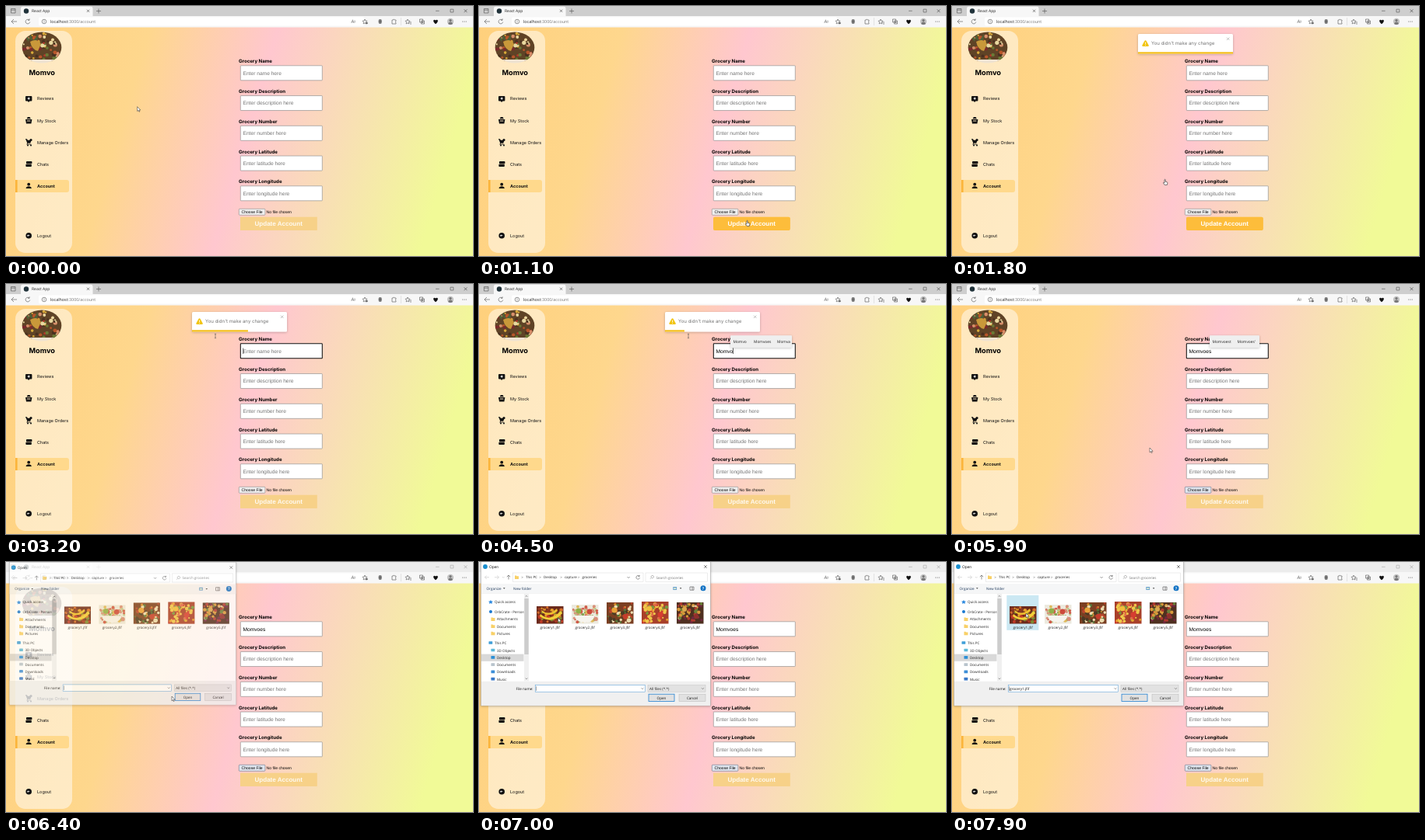
An HTML page that plays this animation: 600 px wide and 322 px high, repeating every 8000 ms.

```html
<!DOCTYPE html>
<html lang="en">
<head>
<meta charset="utf-8">
<title>Account page</title>
<style>
  html, body { margin: 0; width: 100%; height: 100%; overflow: hidden; }
  svg { display: block; width: 100%; height: 100%; text-rendering: geometricPrecision; }
  .page { font-family: Inter, sans-serif; }
  .sys { font-family: "Open Sans", sans-serif; }
  .native { font-family: "Liberation Sans", Arial, sans-serif; }
  .line { fill: none; stroke: #505050; stroke-width: .6; }
</style>
</head>
<body>
<svg id="stage" viewBox="0 0 600 322" preserveAspectRatio="none">
  <defs>
    <linearGradient id="sunset" gradientUnits="userSpaceOnUse" x1="-16" y1="81.5" x2="616" y2="267">
      <stop offset="0" stop-color="#ffd07c"/>
      <stop offset=".27" stop-color="#fed78d"/>
      <stop offset=".51" stop-color="#ffc7cf"/>
      <stop offset=".9" stop-color="#f1fa97"/>
    </linearGradient>
    <filter id="shadow" x="-20%" y="-50%" width="140%" height="200%">
      <feDropShadow dx="0" dy=".8" stdDeviation="1.6" flood-opacity=".25"/>
    </filter>
    <clipPath id="avatarClip"><ellipse cx="46" cy="53.5" rx="25.3" ry="20"/></clipPath>
    <clipPath id="treeClip"><rect x="3" y="41" width="54.5" height="112"/></clipPath>
  </defs>
</svg>
<script>
const LOOP = 8000, STEP = 100;
const stage = document.getElementById('stage');
const BRAND = 'Momvo', TYPED = 'Momvoes';

// Markup helpers
const rect = (x, y, w, h, fill, extra = '') =>
  `<rect x="${x}" y="${y}" width="${w}" height="${h}" fill="${fill}" ${extra}/>`;
const circle = (x, y, r, fill, extra = '') =>
  `<circle cx="${x}" cy="${y}" r="${r}" fill="${fill}" ${extra}/>`;
const text = (x, y, size, str, fill = '#222', extra = '') =>
  `<text x="${x}" y="${y}" font-size="${size}" fill="${fill}" ${extra}>${str}</text>`;
const line = (d, extra = '') => `<path class="line" d="${d}" ${extra}/>`;
const shape = (d, fill = '#111', extra = '') => `<path d="${d}" fill="${fill}" ${extra}/>`;
const group = (attrs, ...parts) => `<g ${attrs}>${parts.join('')}</g>`;
const cross = (x, y, r, color = '#333') =>
  line(`M${x - r} ${y - r}l${2 * r} ${2 * r}m0 ${-2 * r}l${-2 * r} ${2 * r}`, `style="stroke:${color}"`);

function randomizer(seed) {
  return () => (seed = (seed * 16807) % 2147483647) / 2147483647;
}

// Pile of fruit-coloured blobs
function fruit(x, y, w, h, seed, colors, base) {
  const rnd = randomizer(seed);
  let blobs = rect(x, y, w, h, base);
  for (let i = 0; i < 60; i++) {
    const r = 1 + rnd() * 1.7;
    const cx = x + r + rnd() * (w - 2 * r), cy = y + r + rnd() * (h - 2 * r);
    blobs += circle(cx.toFixed(1), cy.toFixed(1), r.toFixed(1), colors[Math.floor(rnd() * colors.length)]);
  }
  return blobs;
}

function browser() {
  const reload = x => line(`M${x + 2} 18.2a2.8 2.8 0 1 0 .7 2.4m-.6-4.3v2h-2`);
  const star = (x, y) => line(`M${x} ${y - 3}l.9 2 2.1.3-1.5 1.5.3 2.1-1.8-1-1.8 1 .3-2.1-1.5-1.5 2.1-.3z`);
  return group('class="sys"',
    rect(0, 0, 600, 13.5, '#cecece', 'id="strip"'),
    rect(0, 13, 600, 14.5, '#f7f7f7'),
    rect(42, 14.5, 418, 11, '#fff', 'rx="2"'),
    shape('M19 13.5V3Q19 .8 21.5 .8H109Q111.5 .8 111.5 3V13.5z', '#f7f7f7'),
    line('M6.5 3.5h5.5v5.5h-5.5zm0 1.7h5.5'),
    circle(26, 6.5, 3.2, '#20323a'),
    text(33, 8.4, 5, 'React App'),
    cross(105.5, 6.3, 1.6),
    group('id="controls"',
      line('M119 3.5v6m-3-3h6M552 6.3h4.6M571 4.2h3.8v3.8h-3.8z'), cross(590.5, 6.3, 1.9)),
    line('M14 20H7m3-3-3 3 3 3'), reload(28),
    `<circle class="line" cx="49" cy="20" r="2.8"/>`, line('M49 19.4v2m0-3.4v.7'),
    text(57, 22, 5.4, 'localhost<tspan fill="#777">:3000/account</tspan>'),
    text(443.5, 22, 6, 'A<tspan font-size="3.5" dy="-1.5">))</tspan>', '#555'),
    star(461, 20), circle(463.5, 22, 1.3, '#666'),
    rect(478.7, 17.2, 4, 5.6, '#888', 'rx="1"'), line('M480.7 17v6m-2.2-3h4.5'),
    line('M496 18h1.5q.8-2.2 1.8 0h1.7v1.7q-2 .8 0 1.8V23h-5z'),
    rect(507, 15, .5, 10, '#ccc'), star(516, 20), line('M518 21h3m-2 2h2'),
    line('M531.5 17h4v4h-4zm2 2h4v4h-4zm2 .8v2.4m-1.2-1.2h2.4'),
    shape('M552 23.2q-3.3-2.5-2.8-4.6 1.1-1.8 2.8-.2 1.7-1.6 2.8.2.5 2.1-2.8 4.6z'),
    circle(571, 20, 4.2, '#c4c4c4'), circle(571, 18.6, 1.6, '#777'),
    shape('M568 23q.4-2.6 3-2.6t3 2.6q-3 2-6 0z', '#777'),
    [586.8, 589, 591.2].map(x => circle(x, 20, .5, '#444')).join(''));
}

function sidebar() {
  const items = [['Reviews', 121.3], ['My Stock', 149.5], ['Manage Orders', 177.7],
    ['Chats', 205.8], ['Account', 234], ['Logout', 297.8]];
  const icons =
    shape('M26 116h6.4q1 0 1 1v4.4q0 1-1 1h-2l-1.3 1.7-1.3-1.7h-1.8q-1 0-1-1V117q0-1 1-1z') +
    shape('M29.2 117l.6 1.5 1.5.6-1.5.6-.6 1.5-.6-1.5-1.5-.6 1.5-.6z', '#fff') +
    shape('M25 146h8.4l-1 5.4h-6.4zM26.5 145.3l1.4-2.3h2.6l1.4 2.3z') + rect(27, 147.5, 4.4, 1, '#fde8c4') +
    shape('M25 171.3h2l.8 1.5h5l-1.6 3.9h-3.2l-.5 1h4.9v.9h-6l.8-2.2-1.6-4.2h-.6z') +
    circle(28, 179.6, 1, '#111') + circle(32, 179.6, 1, '#111') + circle(32, 172.5, 1.6, '#111') +
    rect(26, 199.9, 7.4, 3.3, '#111', 'rx=".8"') + rect(25.4, 203.8, 7.4, 3.3, '#111', 'rx=".8"') +
    circle(29.2, 229.7, 1.9, '#111') + shape('M25.6 235q.4-2.8 3.6-2.8t3.6 2.8z') +
    circle(29.2, 295.7, 3.8, '#111') + shape('M27 295.7l1.5-1.5v1.1h1.8v.8h-1.8v1.1z', '#fff');
  const colors = ['#b8342b', '#d8a93a', '#b9562a', '#e9d9a0', '#6a7a36', '#7a2a2c', '#4a3020', '#d88f6a'];
  return group('class="page"',
    rect(12, 32, 73, 286, '#fff', 'rx="13" opacity=".5"'),
    group('clip-path="url(#avatarClip)"',
      fruit(20, 33, 52, 38, 83, colors, '#5f4326'),
      shape('M23 38l6 8 2-10 4 9 6-9-1 12z', '#4e6238'),
      shape('M31 46q9-5 14 3l-4 9q-8-2-10-12z', '#c9983a'),
      rect(20, 69, 52, 5, '#efe3d2')),
    text(46.2, 88.6, 9.2, BRAND, '#000', 'font-weight="700" text-anchor="middle"'),
    shape('M12 224H78Q81 224 81 227V237Q81 240 78 240H12z', '#ffd98c'),
    rect(12, 224, 2.6, 16, '#fbb43a'),
    icons,
    items.map(([name, y]) =>
      text(40, y, 5.5, name, '#111', name === 'Account' ? 'font-weight="700"' : '')).join(''));
}

function form() {
  const fields = ['Name', 'Description', 'Number', 'Latitude', 'Longitude'];
  return group('class="page"',
    fields.map((name, i) => {
      const y = i * 38.75;
      return text(299, y + 73.3, 6.1, 'Grocery ' + name, '#000', 'font-weight="700"') +
        rect(301.3, y + 76.8, 105, 19, '#fff', `stroke="#8c8c8c" stroke-width=".65" rx=".6" id="box${i}"`) +
        group('class="native"',
          text(304.5, y + 88.5, 6.65, `Enter ${name.toLowerCase()} here`, '#767676', `id="hint${i}"`));
    }).join(''),
    group('class="native"',
      text(304.5, 88.5, 6.65, '', '#000', 'id="typed"'),
      rect(0, 82.5, .6, 7.6, '#000', 'id="caret"'),
      rect(299.3, 261.3, 33.6, 8, '#efefef', 'id="choose" stroke="#767676" stroke-width=".5" rx=".9"'),
      text(316.1, 267.1, 5.08, 'Choose File', '#000', 'text-anchor="middle"'),
      text(334.6, 267.1, 5.08, 'No file chosen', '#000'),
      rect(301, 271.7, 98.8, 17.2, '#f7d188', 'id="updateIdle"'),
      rect(301, 271.7, 98.8, 17.2, '#fdbd3b', 'id="update" rx="2"'),
      text(350.2, 283.2, 8.05, 'Update Account', '#fff', 'id="updateText" font-weight="700" text-anchor="middle"')));
}

function toast() {
  return group('id="toast" class="page"',
    rect(239, 36, 122, 25.5, '#fff', 'rx="1.5" filter="url(#shadow)"'),
    shape('M248.6 44.2q.7 0 1.1.7l3 5.6q.6 1.4-.7 1.6h-6.9q-1.2-.2-.7-1.6l3-5.6q.5-.7 1.2-.7z', '#f1c40f'),
    rect(248.2, 46.5, .9, 2.7, '#fff'), circle(248.6, 50.5, .55, '#fff'),
    text(256, 50.4, 6.1, "You didn't make any change", '#757575'),
    cross(354.7, 42.3, 1.7, '#999'),
    rect(239, 59.3, 122, 2.2, '#f5be17', 'id="bar"'));
}

function thumbnails() {
  const looks = [
    [57, '#6b2a1c', ['#c23a26', '#e8a02c', '#7b8a32', '#8a3a20', '#d9702c']],
    [55, '#eceadf', ['#cf5a48', '#89a655', '#e0b85a', '#b9c98a', '#d98f7a']],
    [52, '#7a3f22', ['#d8922f', '#55763a', '#ecdcb0', '#b8432b', '#4a3a24']],
    [51, '#a8402a', ['#cf3a30', '#e8a030', '#efc84a', '#78983e', '#e06a48']],
    [52, '#4f3020', ['#b03a30', '#d89a3a', '#6f2740', '#6a8038', '#e0c49a']]];
  const details = [
    shape('M79 67q12 11 26-4l2 3q-13 15-29 4z', '#f3cf3a') + shape('M80 62q10 8 20-2l1 3q-10 9-20 2z', '#f0c230'),
    shape('M123 69h26q-3 9-13 9t-13-9z', '#f6f4ee') + circle(128, 63, 3.4, '#8fb04a') + circle(142, 64, 3.4, '#cc4a3c'),
    circle(174, 62, 3.6, '#e9a23a') + circle(188, 70, 3.2, '#c43c2c'),
    circle(219, 60, 3.2, '#f0bf3a') + circle(233, 68, 3.4, '#d63d30'),
    circle(264, 61, 3, '#d8a850') + circle(279, 70, 3, '#8f2f2c')];
  return looks.map(([y, base, colors], i) => {
    const x = 74 + i * 45;
    return fruit(x, y, 34.5, 79.5 - y, 311 + i * 97, colors, base) + details[i] +
      text(x + 17.2, 85.8, 4.6, `grocery${i + 1}.jfif`, '#222', 'text-anchor="middle"');
  }).join('');
}

function dialog() {
  const folder = (x, y) => shape(`M${x} ${y}h2l.6.7h2.4v3.8h-5z`, '#f8d067');
  const tree = [['Quick access', 20, 53], ['OrbCrate - Person', 20, 65.8], ['Attachments', 23, 75.4],
    ['Documents', 23, 84.6], ['Pictures', 23, 93.8], ['This PC', 20, 106], ['3D Objects', 23, 115.5],
    ['Desktop', 23, 124.9], ['Documents', 23, 134.1], ['Downloads', 23, 143.4], ['Music', 23, 152.6]];
  const treeIcons = tree.map(([, x, y], i) => {
    if (i === 0) return shape(`M15 ${y - 4}l1 1.6 2 .2-1.5 1.3.4 2-1.9-1-1.9 1 .4-2-1.5-1.3 2-.2z`, '#2f8be0');
    if (i === 1) return circle(15, y - 1.8, 2, '#1878d0');
    if (i < 5) return folder(x - 7.5, y - 4);
    return rect(x - 7.5, y - 3.8, 4.8, 3.6, ['#3f9fd8', '#5bb9d9', '#2c8fd6', '#b8c4cc', '#3c8ed8', '#3878c8'][i - 5], 'rx=".5"');
  }).join('');
  const crumbs = [['This PC', 60], ['Desktop', 83], ['capture', 110], ['groceries', 132.5]];
  return group('id="dialog" class="sys"',
    rect(2.7, -1, 294.6, 186, '#fff', 'stroke="#999" stroke-width=".5" filter="url(#shadow)"'),
    circle(8, 6, 2.9, '#1a8fcf'), text(13, 8, 4.8, 'Open', '#111'), cross(291, 6, 1.8),
    line('M38 22.5v-5.5m-2.2 2.2 2.2-2.2 2.2 2.2'),
    line('M13 19.7H7.5m2.3-2.3-2.3 2.3 2.3 2.3M20 19.7h5.5m-2.3-2.3 2.3 2.3-2.3 2.3M30 19l1.3 1.3 1.3-1.3',
      'style="stroke:#c4c4c4"'),
    rect(43.5, 14, 167.5, 11.2, '#fff', 'stroke="#d9d9d9" stroke-width=".5"'),
    folder(46, 17.5),
    crumbs.map(([name, x]) => line(`M${x - 5} 18.7l1 1-1 1`) + text(x, 21.4, 4.4, name)).join(''),
    line('M190.5 19l1.6 1.6 1.6-1.6M206 18.3a2.3 2.3 0 1 0 .5 2m-.3-3.5v1.7h-1.7'),
    rect(214, 14, 79.5, 11.2, '#fff', 'stroke="#d9d9d9" stroke-width=".5"'),
    line('M220 21.8l1.5-1.6a1.7 1.7 0 1 1 .5.4', 'style="stroke:#888"'),
    text(227.5, 21.5, 4.55, 'Search groceries', '#777'),
    rect(3, 28, 294, 12.3, '#f5f6f7'), rect(3, 40.2, 294, .4, '#e4e4e4'),
    text(9.5, 35.7, 4.6, 'Organize', '#1e395b'), shape('M31 33.3h2.6l-1.3 1.5z', '#333'),
    text(44, 35.7, 4.6, 'New folder', '#1e395b'),
    rect(249.3, 32, 4.8, 4, '#6ba3cf'), rect(250.2, 33.2, 3, 1.8, '#dcebd2'),
    shape('M257.8 33.3h2.6l-1.3 1.5z', '#333'), line('M271 32h5v4.2h-5zm3 0v4.2'),
    circle(288, 33.8, 3.5, '#1373c4'), text(288, 35.6, 5, '?', '#fff', 'text-anchor="middle" font-weight="700"'),
    rect(3, 118.6, 54.5, 9.2, '#d9d9d9'),
    treeIcons,
    group('clip-path="url(#treeClip)"', tree.map(([name, x, y]) => text(x, y, 4.55, name)).join('')),
    rect(58, 41, 6, 112.5, '#f0f0f0'), rect(58.3, 47, 5.4, 72, '#cdcdcd'),
    line('M59.7 44.7l1.3-1.3 1.3 1.3M59.7 149.5l1.3 1.3 1.3-1.3'),
    rect(70.3, 42.8, 41, 45, '#cbe8f3', 'id="picked"'),
    thumbnails(),
    rect(3, 153.7, 294, 31, '#f0f0f0'),
    text(69.5, 164.7, 4.6, 'File name:', '#111', 'text-anchor="end"'),
    rect(72.2, 158.7, 141, 8.5, '#fff', 'stroke="#4a97d6" stroke-width=".5"'),
    text(74, 164.7, 4.6, '', '#111', 'id="fileName"'), rect(73.6, 160.2, .4, 5.6, '#222'),
    line('M208.5 162.3l1.4 1.4 1.4-1.4'),
    rect(217, 158.7, 74, 8.5, '#e2e2e2', 'stroke="#b8b8b8" stroke-width=".4"'),
    text(219, 164.7, 4.6, 'All files (*.*)'), line('M286 162.3l1.4 1.4 1.4-1.4'),
    rect(218, 170.2, 33, 9.3, '#e1e1e1', 'stroke="#2583d3" stroke-width=".8"'),
    text(234.5, 176.5, 4.6, 'Open', '#111', 'text-anchor="middle"'),
    rect(257, 170.2, 34, 9.3, '#e1e1e1', 'stroke="#b8b8b8" stroke-width=".5"'),
    text(274, 176.5, 4.6, 'Cancel', '#111', 'text-anchor="middle"'));
}

function suggestions(id, x, w, words) {
  return group(`id="${id}" class="sys"`,
    rect(x, 66.2, w, 15.6, '#efefef', 'rx="1" filter="url(#shadow)"'),
    words.map(([wx, word]) => text(wx, 76, 4.9, word, '#222')).join(''));
}

const pointers =
  shape('M0 0V5.8L1.4 4.6 2.3 6.6 3.2 6.2 2.3 4.3H4.1z', '#fff', 'id="arrow" stroke="#222" stroke-width=".5"') +
  shape('M-1-3.3q.7-.9 1.2 0V-.8l2 .5q.8.3.7 1.3L2.4 3.4H-.8L-2.6.8q.3-.9 1.2-.2L-1 .9z', '#fff',
    'id="hand" stroke="#222" stroke-width=".6"') +
  line('M-1.1-2.8Q0-2.8 0-2V2Q0 2.8 1.1 2.8M1.1-2.8Q0-2.8 0-2M-1.1 2.8Q0 2.8 0 2', 'id="beam"');

stage.insertAdjacentHTML('beforeend',
  rect(0, 27, 600, 295, 'url(#sunset)') + browser() + sidebar() + form() +
  suggestions('earlyWords', 323, 79, [[326.5, BRAND], [353, TYPED], [383, 'Momva']]) +
  suggestions('lateWords', 331, 64, [[334.5, TYPED + 't'], [366.5, TYPED + "'"]]) +
  toast() + dialog() + group('id="cursor"', pointers));

const el = {};
stage.querySelectorAll('[id]').forEach(node => el[node.id] = node);

// Motion helpers
const clamp = v => Math.min(1, Math.max(0, v));
const easeOut = p => 1 - (1 - p) ** 3;
const easeInOut = p => p * p * (3 - 2 * p);
const show = (node, on) => node.setAttribute('display', on ? 'inline' : 'none');
const set = (node, attrs) => { for (const k in attrs) node.setAttribute(k, attrs[k]); };

function track(t, keys, ease) {
  if (t <= keys[0][0]) return keys[0].slice(1);
  for (let i = 1; i < keys.length; i++) {
    const [a, b] = [keys[i - 1], keys[i]];
    if (t < b[0]) {
      const p = ease((t - a[0]) / (b[0] - a[0]));
      return a.slice(1).map((v, j) => v + (b[j + 1] - v) * p);
    }
  }
  return keys[keys.length - 1].slice(1);
}

const cursorPath = [[100, 168.7, 129.7], [900, 345, 280], [1350, 345, 280], [1800, 274, 227],
  [2050, 204, 190], [2450, 308, 87], [2700, 306, 86], [2950, 251, 66], [3150, 269, 67], [4950, 269, 67],
  [5450, 316, 264], [5600, 316, 264], [5900, 254, 211], [6400, 213, 173], [7100, 95, 66]];
const toastIn = [[0, -1143, 0], [.6, 9.5, 1], [.75, -3.8, 1], [.9, 1.9, 1], [1, 0, 1]];
const toastOut = [[0, 0, 1], [.2, -3.8, 1], [.4, 7.6, 1], [.45, 7.6, 1], [1, -762, 0]];
const keyTimes = [3500, 3700, 3900, 4150, 4400, 4700, 4950];

function render(t) {
  const [x, y] = track(t, cursorPath, easeInOut);
  set(el.cursor, { transform: `translate(${x} ${y})` });
  const kind = t >= 850 && t < 1850 ? 'hand' : t >= 2350 && t < 4950 ? 'beam' : 'arrow';
  ['arrow', 'hand', 'beam'].forEach(name => show(el[name], name === kind));

  const hover = clamp((t - 800) / 200) * (1 - clamp((t - 1850) / 250));
  set(el.update, { opacity: hover });
  set(el.updateIdle, { rx: 2 * hover });
  set(el.updateText, { opacity: .88 + .12 * hover });

  const leaving = t >= 5190;
  const [dy, alpha] = leaving
    ? track((t - 5190) / 510, toastOut, easeInOut)
    : track((t - 1340) / 470, toastIn, easeOut);
  set(el.toast, { transform: `translate(0 ${dy})`, opacity: alpha });
  set(el.bar, { width: 122 * (1 - clamp((t - 1815) / 3375)) });

  const count = keyTimes.filter(k => t >= k).length;
  const opened = t >= 6300;
  const focused = t >= 2500 && !opened;
  el.typed.textContent = TYPED.slice(0, count);
  show(el.hint0, count === 0);
  set(el.box0, focused ? { stroke: '#101010', 'stroke-width': 1.05 } : { stroke: '#8c8c8c', 'stroke-width': .65 });
  const blink = count ? t < 5290 : (t - 2500) % 680 < 340;
  show(el.caret, focused && blink);
  set(el.caret, { x: 304.5 + (count ? el.typed.getComputedTextLength() : 0) });
  show(el.earlyWords, count > 2 && count < 6);
  show(el.lateWords, count > 5 && !opened);
  set(el.choose, t >= 5400 ? { fill: '#dfe5ee', stroke: '#4f5f78' } : { fill: '#efefef', stroke: '#767676' });

  set(el.strip, { fill: opened ? '#ececec' : '#cecece' });
  set(el.controls, { opacity: opened ? .45 : 1 });
  const grow = easeOut(clamp((t - 6300) / 240));
  const scale = .94 + .06 * grow;
  show(el.dialog, opened);
  set(el.dialog, { opacity: grow, transform: `translate(150 93) scale(${scale}) translate(-150 -93)` });
  show(el.picked, t >= 7100);
  set(el.picked, { opacity: t >= 7400 ? 1 : .5 });
  el.fileName.textContent = t >= 7400 ? 'grocery1.jfif' : '';
}

const start = performance.now();
function tick() {
  const elapsed = (performance.now() - start) % LOOP;
  render(Math.floor(elapsed / STEP) * STEP);
  requestAnimationFrame(tick);
}
tick();
</script>
</body>
</html>
```
